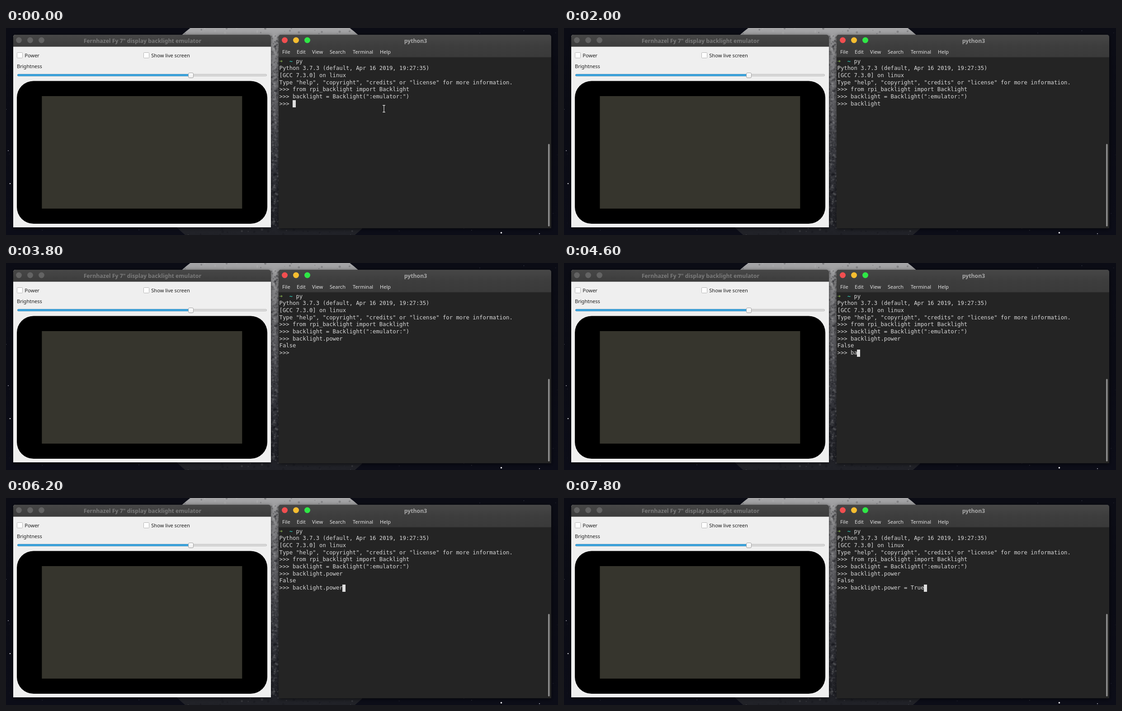
Recreate the animation shown at these times as an HTML page with a canvas. Size 1221x459 px, loop 8 s.

```html
<!DOCTYPE html>
<html lang="en">
<head>
<meta charset="utf-8">
<title>Backlight emulator</title>
<style>
  html, body { margin: 0; width: 100%; height: 100%; overflow: hidden; background: #0a0b14; }
  canvas { display: block; }
</style>
</head>
<body>
<canvas id="stage" width="1221" height="459"></canvas>
<script>
const W = 1221, H = 459, LOOP = 8000;
const CELL = 7.375, ROW = 15.67, LEFT = 604.5, TOP = 66.2;
const UI = '11.06px "Noto Sans", sans-serif';
const TITLE = 'bold 12.25px "Noto Sans", sans-serif';
const MONO = '12.25px "DejaVu Sans Mono", monospace';

const view = document.getElementById('stage').getContext('2d');
const backdrop = document.createElement('canvas');
backdrop.width = W;
backdrop.height = H;
let ctx = backdrop.getContext('2d');

// Small seeded generator for the sky and the moon surface
let seed = 41;
const rand = () => (seed = (seed * 16807) % 2147483647) / 2147483647;

function box(x, y, w, h, fill, radius = 0, stroke) {
  ctx.beginPath();
  ctx.roundRect(x, y, w, h, radius);
  ctx.fillStyle = fill;
  ctx.fill();
  if (stroke) {
    ctx.strokeStyle = stroke;
    ctx.lineWidth = 1;
    ctx.stroke();
  }
}

function dot(x, y, r, fill) {
  ctx.beginPath();
  ctx.arc(x, y, r, 0, Math.PI * 2);
  ctx.fillStyle = fill;
  ctx.fill();
}

function label(text, x, y, font, fill, align = 'left') {
  ctx.font = font;
  ctx.fillStyle = fill;
  ctx.textAlign = align;
  ctx.fillText(text, x, y);
}

function fade(y0, y1, ...colors) {
  const g = ctx.createLinearGradient(0, y0, 0, y1);
  colors.forEach((c, i) => g.addColorStop(i / (colors.length - 1), c));
  return g;
}

function terminal(text, row, col = 0, fill = '#d9d9d9', weight = '') {
  label(text, LEFT + col * CELL, TOP + row * ROW + 11.6, weight + MONO, fill);
}

function drawSky() {
  box(0, 0, W, H, fade(0, H, '#0b0c15', '#0a0b14', '#0c0d18'));
  for (let i = 0; i < 160; i++) {
    dot(rand() * W, rand() * H, 0.3 + rand() * 0.4, `rgba(190,195,215,${0.15 + rand() * 0.4})`);
  }
  dot(9, 345, 1.2, '#e8e8ee');
  dot(5, 272, 0.9, '#b5b5c0');
  dot(1095.5, 454, 1.8, '#f4f4f8');
  dot(1180, 456, 1, '#b8b8c4');

  ctx.save();
  ctx.beginPath();
  ctx.arc(584, 234, 293, 0, Math.PI * 2);
  ctx.clip();
  box(280, 0, 610, H, fade(0, H, '#a6a6a8', '#77777a', '#5a5a5f', '#3c3d43', '#292a30', '#202127'));
  for (let i = 0; i < 900; i++) {
    const light = rand() < 0.45;
    const y = rand() * H;
    const x = y > 16 && y < 442 ? 584 + rand() * 22 : 380 + rand() * 410;
    dot(x, y, 0.5 + rand() * 2.2, light ? 'rgba(210,210,212,.12)' : 'rgba(10,10,16,.2)');
  }
  ctx.restore();
}

function frame(x, y, w, h, fill) {
  ctx.save();
  ctx.shadowColor = 'rgba(0,0,0,.6)';
  ctx.shadowBlur = 9;
  ctx.shadowOffsetY = 2;
  box(x, y, w, h, fill, [5, 5, 0, 0]);
  ctx.restore();
}

function checkbox(x, text) {
  box(x + 0.5, 54.5, 12, 12, '#ffffff', 1, '#b5b5b5');
  label(text, x + 17.3, 64.5, UI, '#1c1c1c');
}

function drawEmulator() {
  frame(16, 15, 570, 427, '#efefef');
  box(16, 15, 570, 26.5, fade(15, 41, '#474747', '#3c3c3c'), [5, 5, 0, 0]);
  [28.5, 53.5, 78.5].forEach(x => dot(x, 27, 6.4, '#636363'));
  label('Fernhazel Fy 7" display backlight emulator', 432, 33, TITLE, '#7b7b7b', 'right');

  checkbox(24, 'Power');
  checkbox(304, 'Show live screen');
  label('Brightness', 24, 88.5, UI, '#1c1c1c');

  box(25.5, 102.5, 551, 4, '#dcdcdc', 2, '#b9b9b9');
  box(25.5, 102.5, 383, 4, '#40a9e2', 2, '#2f86ba');
  box(403.5, 99.5, 11, 11, fade(99, 111, '#ffffff', '#ececec'), 2.5, '#a2a2a2');

  box(24, 117.5, 554, 316.5, '#000000', 37);
  box(79.3, 151, 443, 249.5, '#36352d');
}

function drawTerminal() {
  frame(603, 15, 603, 429, '#242424');
  box(603, 15, 603, 50, fade(15, 65, '#474747', '#3d3d3d', '#3a3a3a'), [5, 5, 0, 0]);
  box(603, 64.3, 603, 0.9, '#303030');
  ['#f24e50', '#f6bd30', '#2fe746'].forEach((c, i) => dot(616.5 + i * 25, 27, 6.5, c));
  label('python3', 906, 33, TITLE, '#a9a9a9', 'center');

  const menu = { File: 611, Edit: 643, View: 677, Search: 716, Terminal: 767, Help: 827 };
  for (const name in menu) label(name, menu[name], 57, UI, '#e2e2e2');
  box(1199, 257, 3.6, 183, '#8b8b8b', 1.8);

  terminal('➜', 0, 0, '#7fa64a', 'bold ');
  terminal('~', 0, 3, '#2fc5b0', 'bold ');
  terminal('py', 0, 5);
  [
    'Python 3.7.3 (default, Apr 16 2019, 19:27:35)',
    '[GCC 7.3.0] on linux',
    'Type "help", "copyright", "credits" or "license" for more information.',
    '>>> from rpi_backlight import Backlight',
    '>>> backlight = Backlight(":emulator:")'
  ].forEach((line, i) => terminal(line, i + 1));
}

drawSky();
drawEmulator();
drawTerminal();
ctx = view;

// Each key: [time, characters typed so far]
const ENTER = 3200;
const query = {
  text: 'backlight.power', row: 6,
  keys: [[400, 1], [500, 2], [800, 3], [1000, 4], [1300, 5], [1400, 9],
         [2100, 10], [2300, 11], [2400, 12], [3100, 15]]
};
const assign = {
  text: 'backlight.power = True', row: 8,
  keys: [[4500, 1], [4600, 2], [4800, 3], [4900, 4], [5100, 9], [5800, 10],
         [6000, 11], [6100, 12], [6200, 15], [6600, 16], [6900, 17], [7000, 18],
         [7300, 19], [7500, 20], [7700, 21], [7800, 22]]
};
const cursorOff = [[100, 400], [2000, 2100], [3000, 3100], [3800, 4400]];

function typed(line, t) {
  let n = 0;
  for (const [at, count] of line.keys) if (t >= at) n = count;
  return n;
}

function drawPointer(x, y) {
  ctx.lineCap = 'round';
  for (const [color, width] of [['#111111', 3.2], ['#e6e6e6', 1.3]]) {
    ctx.strokeStyle = color;
    ctx.lineWidth = width;
    ctx.beginPath();
    ctx.moveTo(x - 2.5, y - 7.5);
    ctx.lineTo(x + 2.5, y - 7.5);
    ctx.moveTo(x, y - 7.5);
    ctx.lineTo(x, y + 7.5);
    ctx.moveTo(x - 2.5, y + 7.5);
    ctx.lineTo(x + 2.5, y + 7.5);
    ctx.stroke();
  }
}

function draw(now) {
  const t = now % LOOP;
  ctx.drawImage(backdrop, 0, 0);

  const line = t < ENTER ? query : assign;
  if (line === assign) {
    terminal('>>> ' + query.text, query.row);
    terminal('False', 7);
  }
  const n = typed(line, t);
  terminal('>>> ' + line.text.slice(0, n), line.row);

  if (!cursorOff.some(([from, to]) => t >= from && t < to)) {
    const x = Math.round(LEFT - 0.4 + (4 + n) * CELL);
    box(x, Math.round(TOP + line.row * ROW), 7, 16, '#dedede');
  }
  if (t < query.keys[0][0]) drawPointer(836, 179);
  requestAnimationFrame(draw);
}
requestAnimationFrame(draw);
</script>
</body>
</html>
```
